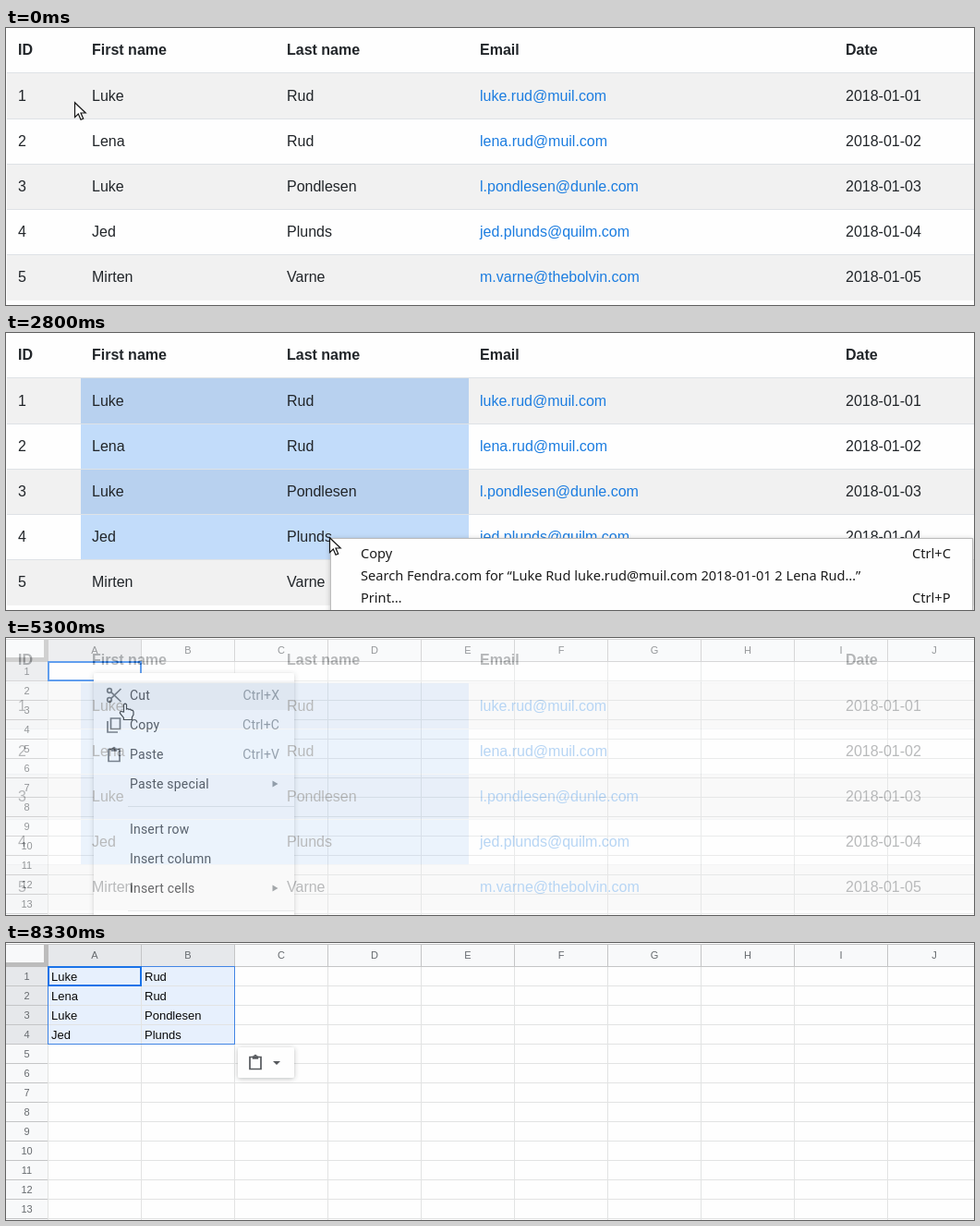
Animation, 1048 px wide and 300 px high, one loop 8.43 s. Source, as an HTML page:

```html
<!DOCTYPE html>
<html lang="en">
<head>
<meta charset="utf-8">
<title>Table cells to spreadsheet</title>
<style>
  html, body { margin: 0; width: 100%; height: 100%; overflow: hidden; background: #fefefe; }
  svg { display: block; width: 1048px; height: 300px; }
  text { white-space: pre; }
  .table { font: 16px "Liberation Sans", Arial, sans-serif; fill: #212529; }
  .head { font-weight: bold; }
  .link { fill: #1c7de0; }
  .native { font: 14.6px "Noto Sans", sans-serif; fill: #1c1c1c; }
  .label { font: 11px "Liberation Sans", Arial, sans-serif; fill: #666a6e; text-anchor: middle; }
  .cell { font: 13px "Liberation Sans", Arial, sans-serif; fill: #0a0a0a; }
  .menu { font: 14px Roboto, sans-serif; letter-spacing: .2px; fill: #2a2b2e; }
  .key { fill: #80868b; text-anchor: end; }
</style>
</head>
<body>
<svg id="stage" viewBox="0 0 1048 300" xmlns="http://www.w3.org/2000/svg">
  <defs>
    <filter id="shadow" x="-10%" y="-20%" width="120%" height="150%">
      <feDropShadow dx="0" dy="1" stdDeviation="2.5" flood-color="#3c4043" flood-opacity=".35"/>
    </filter>
    <path id="arrow" d="M.5 .7V16.6L4.3 13L7 19.3L9.7 18.2L7 12H12.2Z" fill="#fefefe" stroke="#141414" stroke-width="1.2"/>
    <path id="hand" d="M-1.5 9V1.2Q0 -.8 1.5 1.2V6Q3 5 4 6.5Q5.5 5.6 6.6 7.2Q8.6 6.8 9 8.8V12L7.4 15V17.5H-1.6V15.4L-5.6 10.5Q-5.8 8 -3.6 8.6Z" fill="#fefefe" stroke="#141414" stroke-width="1.2"/>
    <g id="clip" fill="none" stroke="#55585c" stroke-width="1.7">
      <path d="M1 3H13V16H1Z"/><path d="M3.8 2H10.2V5.2H3.8Z" fill="#55585c" stroke="none"/><circle cx="7" cy="1.9" r="1.1" stroke-width="1.2"/>
    </g>
  </defs>
</svg>
<script>
const LOOP = 8430;
const FADE = [4190, 5800];
const PAPER = '#fefefe', INK = '#55585c', GRID = '#e2e3e3', EDGE = '#c4c5c6';
const people = [
  ['Luke', 'Rud', 'luke.rud@muil.com'],
  ['Lena', 'Rud', 'lena.rud@muil.com'],
  ['Luke', 'Pondlesen', 'l.pondlesen@dunle.com'],
  ['Jed', 'Plunds', 'jed.plunds@quilm.com'],
  ['Mirten', 'Varne', 'm.varne@thebolvin.com']
];
const range = (n, f) => Array.from({ length: n }, (_, i) => f(i)).join('');
const rect = (x, y, w, h, fill, extra = '') =>
  `<rect x="${x}" y="${y}" width="${w}" height="${h}" fill="${fill}" ${extra}/>`;
const text = (x, y, s, cls) => `<text x="${x}" y="${y}" class="${cls}">${s}</text>`;
const group = (id, body) => `<g id="${id}">${body}</g>`;
const use = (id, x, y) => `<use href="#${id}" x="${x}" y="${y}"/>`;

// Web table
const colX = [13, 93, 304, 513, 909];
const rowY = i => 49 + 49 * i + (i ? 1 : 0);
function tableMarkup() {
  const heads = ['ID', 'First name', 'Last name', 'Email', 'Date'];
  const rows = range(5, i => {
    const [first, last, mail] = people[i];
    const y = rowY(i), h = rowY(i + 1) - y;
    const vals = [i + 1, first, last, mail, `2018-01-0${i + 1}`];
    return (i % 2 ? '' : rect(1, y, 1047, h, '#f1f1f1')) +
      rect(81, y, 420, h, i % 2 ? '#c2dcfa' : '#b8d1ef', `id="pick${i}"`) +
      rect(1, y - 1, 1047, 1, '#dee2e6') +
      range(5, c => text(colX[c], 79 + 49 * i, vals[c], c === 3 ? 'table link' : 'table'));
  });
  const [a, b] = people;
  const query = `Search Fendra.com for “${a.join(' ')} 2018-01-01 2 ${b[0]} ${b[1]}…”`;
  const native = rect(351.5, 222.5, 695, 120, PAPER, 'stroke="#bcbcbc" filter="url(#shadow)"') +
    rect(352, 227, 694, 24, '#ebebeb', 'id="copyHover"') +
    text(384, 244, 'Copy', 'native') + text(981, 244, 'Ctrl+C', 'native') +
    text(384, 268, query, 'native') +
    text(384, 292, 'Print…', 'native') + text(981, 292, 'Ctrl+P', 'native');
  return rect(0, 0, 1048, 300, PAPER) +
    range(5, c => text(colX[c], 29, heads[c], 'table head')) + rows +
    group('native', native) + group('mouseA', use('arrow', 0, 0));
}

// Spreadsheet
const headers = (cols, rows) =>
  rect(46, 2, 101 * cols - 1, 23, '#e6e8eb') + rect(0, 26, 45, 21 * rows - 1, '#e6e8eb');
function gridMarkup() {
  const cols = range(10, i =>
    rect(45 + 101 * i, 26, 1, 274, GRID) + rect(45 + 101 * i, 2, 1, 24, EDGE) +
    text(96 + 101 * i, 17, 'ABCDEFGHIJ'[i], 'label'));
  const rows = range(13, i =>
    rect(46, 46 + 21 * i, 1002, 1, GRID) + rect(0, 46 + 21 * i, 45, 1, EDGE) +
    text(22.5, 40 + 21 * i, i + 1, 'label'));
  return rect(0, 0, 1048, 300, PAPER) +
    rect(0, 2, 1048, 23, '#f8f9fa') + rect(0, 26, 45, 274, '#f8f9fa') +
    group('headOne', headers(1, 1)) + group('headMany', headers(2, 4)) +
    rect(46, 26, 202, 84, '#e7f0fd', 'id="range"') + cols + rows +
    rect(0, 1, 1048, 1, EDGE) + rect(0, 25, 1048, 1, EDGE) +
    rect(41, 2, 5, 24, '#bcbcbc') + rect(0, 21, 46, 5, '#bcbcbc');
}
function pastedMarkup() {
  return rect(45.5, 25.5, 202, 84, 'none', 'stroke="#4285e4"') +
    range(4, i => text(49, 41 + 21 * i, people[i][0], 'cell') + text(150, 41 + 21 * i, people[i][1], 'cell')) +
    rect(251, 113, 61, 33, PAPER, 'rx="2" filter="url(#shadow)"') + use('clip', 263, 120.5) +
    `<path d="M289 128H297L293 132Z" fill="${INK}"/>`;
}
function menuMarkup() {
  const items = [
    ['Cut', 62, 'Ctrl+X'], ['Copy', 94, 'Ctrl+C'], ['Paste', 126, 'Ctrl+V'], ['Paste special', 158, '>'],
    ['Insert row', 207], ['Insert column', 239], ['Insert cells', 271, '>']
  ];
  const labels = items.map(([name, y, key]) => text(134, y + 5, name, 'menu') +
    (key === '>' ? `<path d="M288.5 ${y - 3.5}L294.5 ${y}L288.5 ${y + 3.5}Z" fill="#80868b"/>`
      : key ? text(296.2, y + 5, key, 'menu key') : '')).join('');
  const icons = `<g fill="none" stroke="${INK}" stroke-width="1.7"><circle cx="112" cy="57" r="2.3"/>
    <circle cx="112" cy="67" r="2.3"/><path d="M113.8 58.6L124.5 69M113.8 65.4L124.5 55"/>
    <path d="M113.5 87H123.5V98.5H113.5ZM110 90V102H121"/></g>` + use('clip', 110, 117.5);
  return rect(95, 38, 217, 290, PAPER, 'rx="2" filter="url(#shadow)"') +
    rect(95, 46, 217, 32, '#f1f2f3', 'id="hover"') + labels + icons +
    rect(132, 182, 180, 1, '#dfe1e3') + rect(132, 295, 180, 1, '#dfe1e3');
}
const sheetMarkup = () => gridMarkup() + group('pasted', pastedMarkup()) +
  rect(46, 26, 100, 20, 'none', 'stroke="#1a73e8" stroke-width="2"') +
  group('menu', menuMarkup()) +
  group('mouseB', group('pointer', use('arrow', 0, 0)) + group('finger', use('hand', 0, 0)));

document.getElementById('stage').insertAdjacentHTML('beforeend',
  group('sheet', sheetMarkup()) + group('table', tableMarkup()));

// Timing
const $ = id => document.getElementById(id);
const show = (id, on) => $(id).setAttribute('display', on ? 'inline' : 'none');
const moveTo = (id, [x, y]) => $(id).setAttribute('transform', `translate(${x.toFixed(2)} ${y.toFixed(2)})`);
const pathA = [[0, 74, 80], [450, 98, 76], [620, 98, 76], [1530, 303, 179], [1950, 350, 221],
  [2900, 350, 221], [3350, 382, 237]];
const pathB = [[4250, 94, 46], [4700, 95, 38], [5050, 95, 38], [5300, 129, 71], [5770, 154, 120],
  [6450, 154, 120], [6930, 190, 304]];

function along(path, t) {
  if (t <= path[0][0]) return path[0].slice(1);
  const i = path.findIndex(p => p[0] > t);
  if (i < 0) return path[path.length - 1].slice(1);
  const [t0, x0, y0] = path[i - 1], [t1, x1, y1] = path[i];
  const k = (t - t0) / (t1 - t0), e = k * k * (3 - 2 * k);
  return [x0 + (x1 - x0) * e, y0 + (y1 - y0) * e];
}

function draw(t) {
  const a = along(pathA, t), b = along(pathB, t);
  const fade = Math.min(1, Math.max(0, (t - FADE[0]) / (FADE[1] - FADE[0])));
  const menuOpen = t >= 4850 && t < 6180;
  const pasted = t >= 6420;

  show('table', fade < 1);
  $('table').setAttribute('opacity', 1 - fade);
  for (let i = 0; i < 5; i++) {
    show('pick' + i, t > 620 && a[1] >= rowY(i));
    $('pick' + i).setAttribute('width', a[0] >= 292 ? 420 : 211);
  }
  show('native', t >= 2680 && t < 3620);
  show('copyHover', a[0] > 352 && a[1] > 227);
  moveTo('mouseA', a);
  show('mouseA', t < 4400);

  show('headOne', !pasted);
  for (const id of ['headMany', 'range', 'pasted']) show(id, pasted);
  show('menu', menuOpen);
  const item = Math.floor((b[1] - 46) / 32);
  const onItem = menuOpen && item >= 0;
  show('hover', onItem);
  $('hover').setAttribute('y', 46 + 32 * item);
  moveTo('mouseB', b);
  show('finger', onItem);
  show('pointer', !onItem);
}

const start = performance.now();
function tick() {
  draw((performance.now() - start) % LOOP);
  requestAnimationFrame(tick);
}
draw(0);
requestAnimationFrame(tick);
</script>
</body>
</html>
```
